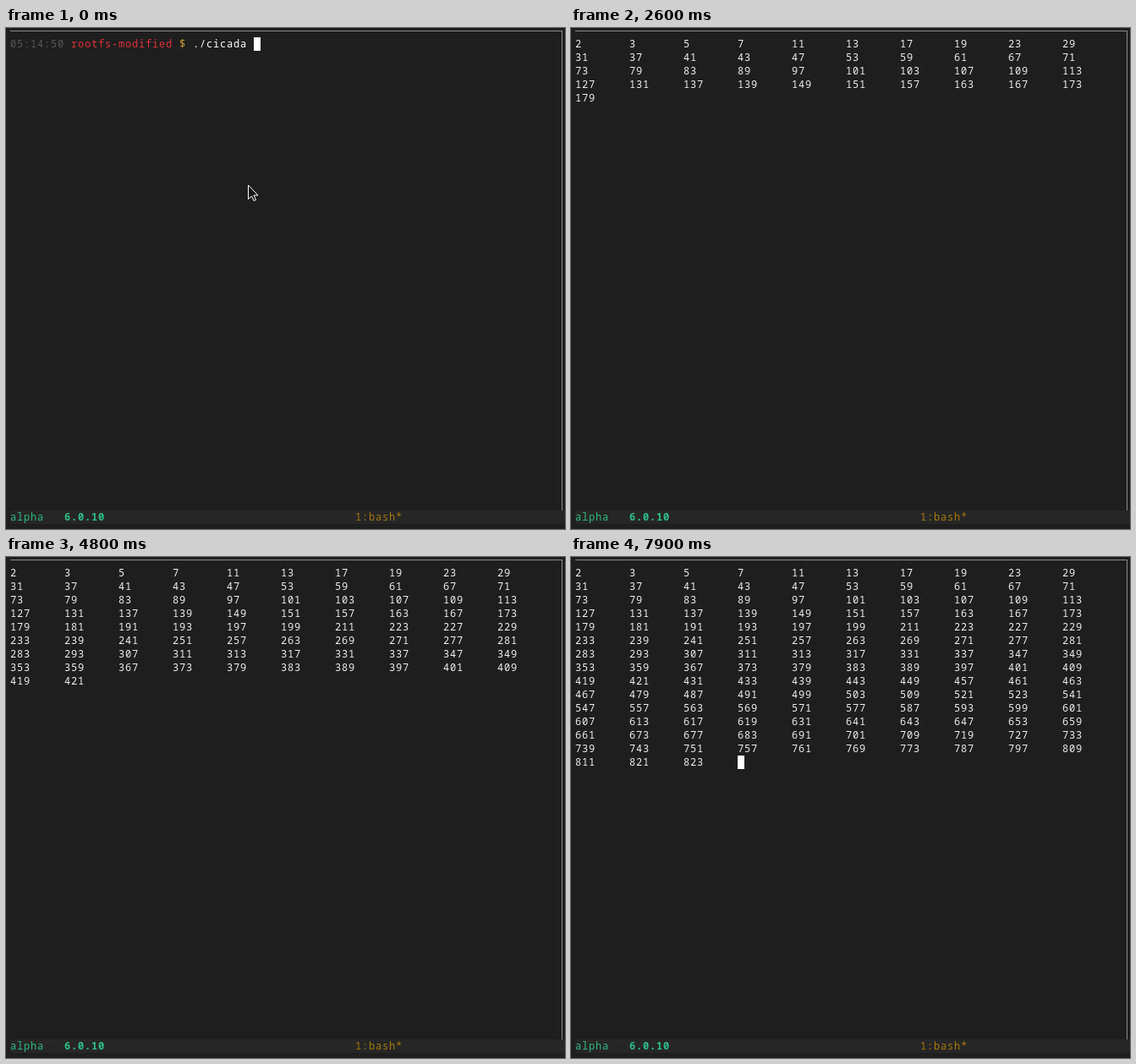
Animation, 661 px wide and 593 px high, one loop 8000 ms. Source, as an HTML page:

```html
<!DOCTYPE html>
<html lang="en">
<head>
<meta charset="utf-8">
<title>Prime numbers in a terminal</title>
<style>
  html, body { margin: 0; width: 100%; height: 100%; overflow: hidden; background: #1e1e1e; }
  svg { display: block; }
  text {
    font: 12px "Noto Sans Mono", "DejaVu Sans Mono", monospace;
    letter-spacing: .8px;
    fill: #eee;
    white-space: pre;
  }
  .time { fill: #585858; }
  .dir { fill: #e0313b; }
  .sign { fill: #d9a52b; }
  .command { fill: #fff; }
  .host { fill: #2eb886; }
  .version { fill: #2ebf8b; font-weight: bold; }
  .dash { fill: #1c1c1c; }
  .tab { fill: #a87b08; }
</style>
</head>
<body>
<svg width="661" height="593" viewBox="0 0 661 593">
  <rect width="661" height="593" fill="#1e1e1e"/>
  <g fill="#8c8c8c">
    <rect x="5" y="3" width="653" height="1"/>
    <rect x="657" y="3" width="1" height="568"/>
  </g>

  <rect x="5" y="571" width="656" height="16" fill="#262626"/>
  <text class="host" x="5" y="583">alpha</text>
  <text class="dash" x="53" y="583">-</text>
  <text class="version" x="69" y="583">6.0.10</text>
  <text class="tab" x="413" y="583">1:bash*</text>

  <g id="prompt">
    <text class="time" x="5" y="23">05:14:50</text>
    <text class="dir" x="77" y="23">rootfs-modified</text>
    <text class="sign" x="205" y="23">$</text>
    <text class="command" x="221" y="23">./cicada</text>
    <path d="M286.5 186v16.5l4-3.5 2.5 5.5 2.5-1-2.5-5.5h5z" fill="#111" stroke="#fff"/>
  </g>
  <g id="primes"></g>
  <rect id="cursor" width="8" height="16" fill="#fff"/>
</svg>
<script>
  const LOOP = 8000, STEP = 100, RUN = 400, COLUMNS = 10, TOTAL = 143;
  const BLINK_START = 450, BLINK_HALF = 600;

  // [time in ms, numbers printed]; flat stretches are short stalls in the output
  const progress = [
    [RUN, 0], [1200, 15], [2100, 32], [2400, 38], [2500, 38], [2600, 41],
    [3300, 54], [4800, 82], [5200, 91], [5400, 96], [5500, 96],
    [6700, 120], [6900, 124], [7000, 124], [7900, TOTAL]
  ];

  const prompt = document.getElementById("prompt");
  const cursor = document.getElementById("cursor");
  const list = document.getElementById("primes");

  const cellX = i => 5 + (i % COLUMNS) * 64;
  const cellY = i => 11 + Math.floor(i / COLUMNS) * 16;

  const primes = [];
  for (let n = 2; primes.length < TOTAL; n++) {
    if (primes.every(p => n % p)) primes.push(n);
  }
  const labels = primes.map((prime, i) => {
    const label = document.createElementNS("http://www.w3.org/2000/svg", "text");
    label.setAttribute("x", cellX(i));
    label.setAttribute("y", cellY(i) + 12);
    label.textContent = prime;
    return list.appendChild(label);
  });

  function printedAt(t) {
    const next = progress.findIndex(([time]) => time > t);
    if (next < 0) return TOTAL;
    if (next === 0) return 0;
    const [t0, n0] = progress[next - 1], [t1, n1] = progress[next];
    return Math.floor(n0 + (n1 - n0) * (t - t0) / (t1 - t0) + 1e-6);
  }

  function cursorOn(t) {
    if (t < RUN) return t < 200;
    return t < BLINK_START || Math.floor((t - BLINK_START) / BLINK_HALF) % 2 === 0;
  }

  const show = (node, visible) => node.setAttribute("visibility", visible ? "visible" : "hidden");

  function draw(time) {
    const t = Math.floor(time % LOOP / STEP) * STEP;
    const count = printedAt(t);
    show(prompt, t < RUN);
    labels.forEach((label, i) => show(label, i < count));
    cursor.setAttribute("x", t < RUN ? 293 : cellX(count));
    cursor.setAttribute("y", t < RUN ? 11 : cellY(count));
    show(cursor, cursorOn(t));
  }

  let start;
  function tick(now) {
    start ??= now;
    draw(now - start);
    requestAnimationFrame(tick);
  }
  draw(0);
  requestAnimationFrame(tick);
</script>
</body>
</html>
```
